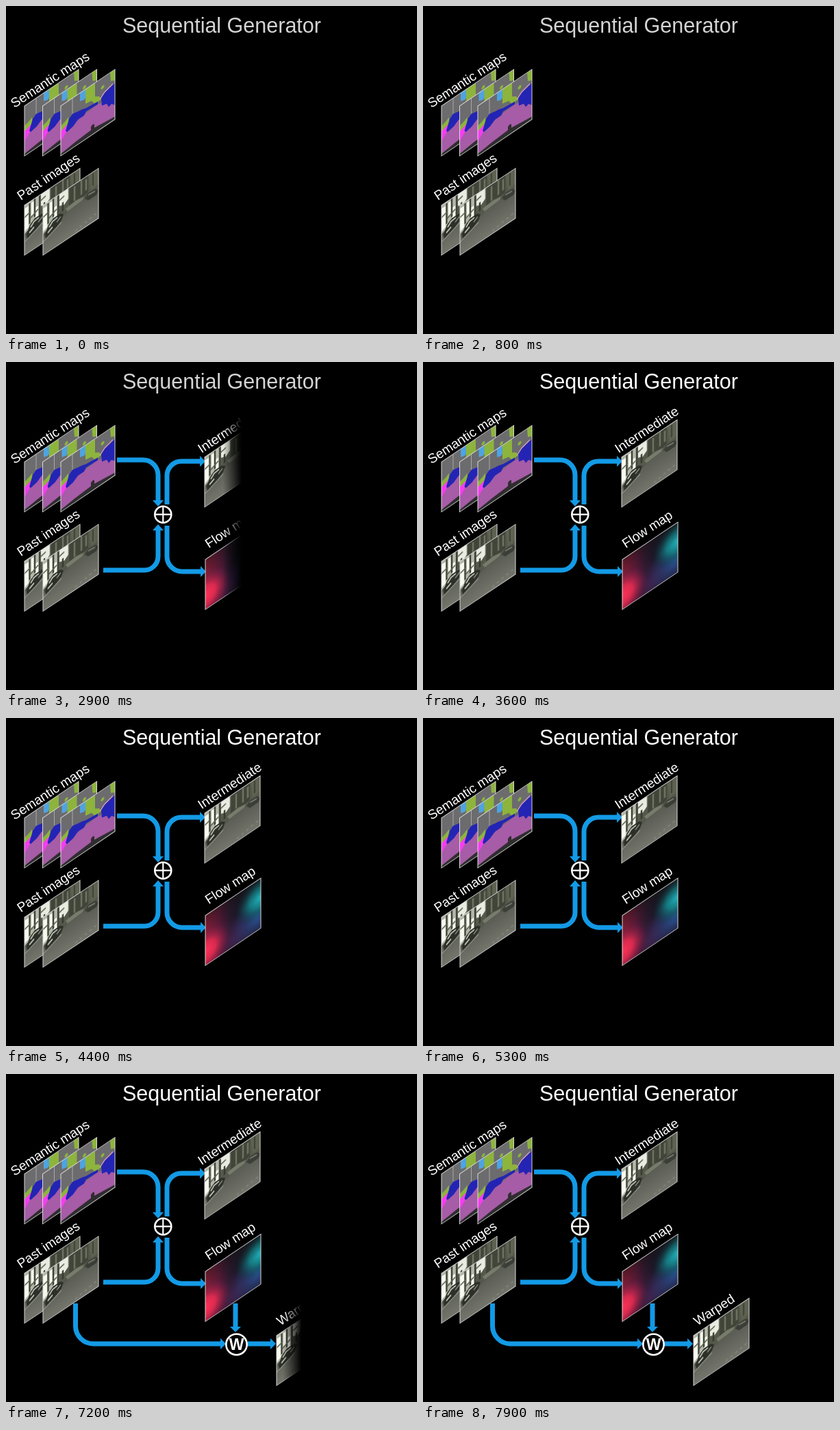
An HTML page for the animation above (8000 ms loop, 600 by 479 pixels).

```html
<!DOCTYPE html>
<html lang="en">
<head>
<meta charset="utf-8">
<title>Sequential Generator</title>
<style>
  @property --edge { syntax: "<length>"; inherits: false; initial-value: 0px; }

  html, body { margin: 0; width: 100%; height: 100%; overflow: hidden; background: #000; }
  svg { position: absolute; left: 0; top: 0; width: 600px; height: 479px; }
  text { font-family: "Liberation Sans", Arial, sans-serif; fill: #fff; }

  .label { font-size: 19.2px; }
  .title { font-size: 30.5px; animation: brighten 8s step-end infinite; }
  .badge { font-size: 23px; font-weight: bold; text-anchor: middle; }
  .line { fill: none; stroke: #139ae6; stroke-width: 7; }
  .head { fill: #139ae6; }
  .frame { fill: none; stroke: #d8d8d8; stroke-width: 1; }
  .ring { fill: #000; stroke: #fff; stroke-width: 2.6; }

  .wipe {
    --dir: 90deg;
    --soft: 27px;
    --ramp: linear-gradient(var(--dir), #000 calc(var(--edge) - var(--soft)), transparent var(--edge));
    -webkit-mask-image: var(--ramp);
    mask-image: var(--ramp);
    animation: 8s linear infinite;
  }
  .down { --dir: 180deg; --soft: 6px; }
  #inputs { animation-name: inputs; }
  #outputs { animation-name: outputs; }
  #past-line { animation-name: past-line; }
  #flow-line { animation-name: flow-line; }
  #warped { animation-name: warped; }

  @keyframes brighten { 0% { fill: #d4d4d4; } 37.5%, 100% { fill: #fff; } }
  @keyframes inputs {
    0%, 25.75% { --edge: 142px; }
    32%, 100% { --edge: 260px; }
  }
  @keyframes outputs {
    0%, 32% { --edge: 215px; }
    38.25%, 100% { --edge: 404px; }
  }
  @keyframes past-line {
    0%, 80.1% { --edge: 97px; }
    86.3%, 100% { --edge: 350px; }
  }
  @keyframes flow-line {
    0%, 80.1% { --edge: 331px; }
    86.3%, 100% { --edge: 384px; }
  }
  @keyframes warped {
    0%, 86.25% { --edge: 318px; }
    92.5%, 100% { --edge: 506px; }
  }
</style>
</head>
<body>

<svg viewBox="0 0 600 479">
  <defs>
    <clipPath id="box"><rect width="81" height="73"/></clipPath>
    <filter id="soft" x="-10%" y="-10%" width="120%" height="120%"><feGaussianBlur stdDeviation=".55"/></filter>

    <linearGradient id="road" x2="0" y2="1">
      <stop stop-color="#50544c"/><stop offset=".5" stop-color="#5d5f57"/><stop offset="1" stop-color="#74766c"/>
    </linearGradient>
    <linearGradient id="dim-red" x2="1" y2="0">
      <stop stop-color="#96203c"/><stop offset=".25" stop-color="#5a1a38"/>
      <stop offset=".6" stop-color="#24182e" stop-opacity="0"/>
    </linearGradient>
    <radialGradient id="red" cx="0" cy=".72" r=".46">
      <stop stop-color="#ff3358"/><stop offset=".4" stop-color="#d82a4e"/><stop offset="1" stop-color="#6a1c46" stop-opacity="0"/>
    </radialGradient>
    <linearGradient id="shade" x2="0" y2="1">
      <stop stop-color="#10100e" stop-opacity=".45"/><stop offset=".4" stop-color="#10100e" stop-opacity="0"/>
    </linearGradient>
    <radialGradient id="teal" cx="1" cy=".36" r=".46">
      <stop stop-color="#22b4c0"/><stop offset=".45" stop-color="#15777f"/><stop offset="1" stop-color="#0d3138" stop-opacity="0"/>
    </radialGradient>
    <radialGradient id="blue" cx=".95" cy=".72" r=".5">
      <stop stop-color="#2c589c"/><stop offset="1" stop-color="#2b3470" stop-opacity="0"/>
    </radialGradient>
    <radialGradient id="violet" cx=".45" cy=".85" r=".45">
      <stop stop-color="#452a5c"/><stop offset="1" stop-color="#452a5c" stop-opacity="0"/>
    </radialGradient>

    <!-- Panel pictures are flat, the matrix on each use leans them. -->
    <g id="semantic">
      <g clip-path="url(#box)">
        <rect width="79" height="73" fill="#6c6c6e"/>
        <path d="M17 0V26" stroke="#a8a8a8"/>
        <path d="M28 0H38V11L34 14 28 12Z" fill="#4fa3e0"/>
        <path d="M36 0H50V20L56 24 59 30 50 31 45 23 36 21Z" fill="#8db43c"/>
        <circle cx="61" cy="14" r="2.5" fill="#8db43c"/>
        <path d="M72 0H79V16L73 13Z" fill="#8db43c"/>
        <path d="M0 29 6 27 11 24 12 37 0 38Z" fill="#8db43c"/>
        <path d="M0 37 11 33V43L0 53Z" fill="#f53df0"/>
        <path d="M0 52 9 42 30 36 53 34 60 36 79 46V69H0Z" fill="#a65ca6"/>
        <path d="M7 41 12 27 17 23 25 25 31 26 37 28 54 30V34L37 33 34 37 25 37 18 42 9 44Z" fill="#2424b4"/>
        <path d="M59 29 64 24 79 20V52L74 47 70 49 67 42 60 40Z" fill="#2424b4"/>
        <path d="M57 29 64 23 76 19" fill="none" stroke="#f3a6d0" stroke-width="1.3"/>
        <path d="M0 70 20 67 44 65V60Q47 57 49 60V65L79 69V73H0Z" fill="#302d30"/>
      </g>
      <rect class="frame" width="79" height="73"/>
    </g>

    <g id="photo">
      <g clip-path="url(#box)">
        <rect width="81" height="73" fill="url(#road)"/>
        <g filter="url(#soft)">
          <path d="M0 0H81V33L60 32 38 34 0 48Z" fill="#55594c"/>
          <path d="M0 0H23V34L0 42Z" fill="#b4b8aa"/>
          <path d="M0 5H6V36L0 39ZM10 3H14V22H10ZM16 14H20V31H16Z" fill="#f6f9ee"/>
          <path d="M24 0H37V15L31 20 24 17Z" fill="#e8ece1"/>
          <path d="M7.5 2V32M15 0V27M22 0V30M29 15V28" fill="none" stroke="#34382e" stroke-width="2.2"/>
          <path d="M0 18 9 15M8 25 20 19M24 9 31 7" stroke="#5d6253" stroke-width="2"/>
          <path d="M39 0H66V25L48 30 38 27Z" fill="#414539"/>
          <path d="M46 3V24M56 1V22M63 4V20" stroke="#6f7462" stroke-width="2.5"/>
          <path d="M67 0H81V23L70 25Z" fill="#5e6251"/>
          <path d="M73 2V20" stroke="#3f4336" stroke-width="2"/>
          <path d="M33 27 48 25 60 27 58 31 36 33Z" fill="#777b6c"/>
          <path d="M3 44 8 34 15 29 25 29 30 33 27 40 14 49 4 52Z" fill="#2d3029"/>
          <path d="M9 38 14 33 21 32M7 45 14 41" fill="none" stroke="#c9cdc0" stroke-width="2.2"/>
          <path d="M20 38 26 34" stroke="#8d9184" stroke-width="2"/>
          <path d="M61 31 66 26 77 27 81 33 78 37 66 37Z" fill="#3b3e36"/>
          <path d="M66 29 76 30" stroke="#8b8f81" stroke-width="1.6"/>
          <path d="M0 54 27 43" stroke="#8f9287" stroke-width="1.5"/>
          <path d="M47 69 80 63" stroke="#8b8d84" stroke-width="1.5" stroke-dasharray="3 4"/>
        </g>
      </g>
      <rect class="frame" width="81" height="73"/>
    </g>

    <g id="flow">
      <g clip-path="url(#box)">
        <rect width="81" height="73" fill="#1c1828"/>
        <rect width="81" height="73" fill="url(#violet)"/>
        <rect width="81" height="73" fill="url(#blue)"/>
        <rect width="81" height="73" fill="url(#dim-red)"/>
        <rect width="81" height="73" fill="url(#red)"/>
        <rect width="81" height="73" fill="url(#teal)"/>
        <rect width="81" height="73" fill="url(#shade)"/>
      </g>
      <rect class="frame" width="81" height="73"/>
    </g>
  </defs>

  <text class="title" x="170" y="39">Sequential Generator</text>

  <use href="#semantic" transform="matrix(1 -.677 0 1 27 146)"/>
  <use href="#semantic" transform="matrix(1 -.677 0 1 53.5 146)"/>
  <use href="#semantic" transform="matrix(1 -.677 0 1 80 146)"/>
  <text class="label" transform="translate(12.3 149.3) rotate(-33)">Semantic maps</text>

  <use href="#photo" transform="matrix(1 -.667 0 1 27 291)"/>
  <use href="#photo" transform="matrix(1 -.667 0 1 54 291)"/>
  <text class="label" transform="translate(21.7 284.3) rotate(-34)">Past images</text>
</svg>

<svg id="inputs" class="wipe" viewBox="0 0 600 479">
  <path class="line" d="M162 143H200A22 22 0 0 1 222 165V204"/>
  <path class="head" d="M214 202H230L222 211Z"/>
  <path class="line" d="M142 304H202A20 20 0 0 0 222 284V245"/>
  <path class="head" d="M214 246H230L222 237Z"/>
</svg>

<svg id="outputs" class="wipe" viewBox="0 0 600 479">
  <path class="line" d="M235 208V166A21 21 0 0 1 256 145H284"/>
  <path class="head" d="M283 137V153L291 145Z"/>
  <path class="line" d="M235 239V284A22 22 0 0 0 257 306H285"/>
  <path class="head" d="M284 298V314L292 306Z"/>
  <circle class="ring" cx="229.3" cy="222.7" r="12"/>
  <path d="M217 222.7H241M229.3 211V235" stroke="#fff" stroke-width="2.2"/>

  <use href="#photo" transform="matrix(1 -.675 0 1 290 139)"/>
  <text class="label" transform="translate(285.6 133.6) rotate(-33.3)">Intermediate</text>
  <use href="#flow" transform="matrix(1 -.675 0 1 291 288.5)"/>
  <text class="label" transform="translate(296 272.3) rotate(-33)">Flow map</text>
</svg>

<svg id="past-line" class="wipe" viewBox="0 0 600 479">
  <path class="line" d="M101.5 335V368A26 26 0 0 0 127.5 394H314"/>
  <path class="head" d="M313 386V402L321 394Z"/>
</svg>

<svg id="flow-line" class="wipe down" viewBox="0 0 600 479">
  <path class="line" d="M335 335V370"/>
  <path class="head" d="M327 369H343L335 377Z"/>
</svg>

<svg id="warped" class="wipe" viewBox="0 0 600 479">
  <path class="line" d="M353 394H387"/>
  <path class="head" d="M386 386V402L394 394Z"/>
  <circle class="ring" cx="336.5" cy="395" r="15.2"/>
  <text class="badge" x="336.5" y="403">W</text>
  <use href="#photo" transform="matrix(1 -.675 0 1 395 382)"/>
  <text class="label" transform="translate(400.6 368) rotate(-33)">Warped</text>
</svg>

</body>
</html>
```
